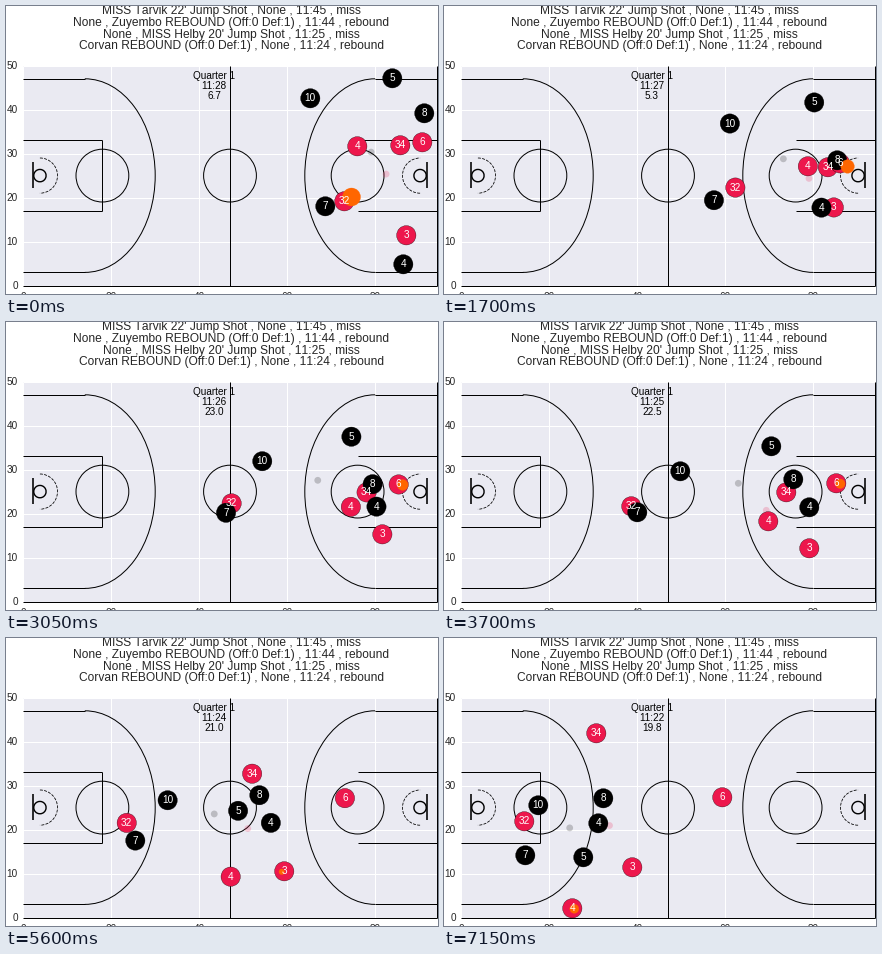
Write a matplotlib script that moves like this. It is 432 px wide and 288 px high and loops after 7.2 s.

```python
import numpy as np
import matplotlib.pyplot as plt
from matplotlib.animation import FuncAnimation
from matplotlib.patches import Arc, Circle, Rectangle

W, H, FRAMES = 432, 288, 144
X0, Y0, FT = 17.2, 279.6, 4.4  # court corner and pixels per foot
INK, RED, ORANGE = "#262626", "#ed174c", (1, 0.4, 0)

plt.rcParams["font.family"] = "Liberation Sans"
plt.rcParams["font.size"] = 10
plt.rcParams["text.kerning_factor"] = 6

# Each player: start, rebound, start of the fast break, end
KEYS = np.array([0, 48, 74, 143])
HOME = {
    "4": [(351, 140), (359, 171), (324, 199), (128, 270)],
    "34": [(394, 139), (374, 167), (342, 170), (152, 95)],
    "6": [(416, 136), (391, 162), (392, 161), (278, 159)],
    "32": [(338, 195), (263, 179), (187, 184), (80, 183)],
    "3": [(400, 229), (383, 200), (365, 226), (188, 229)],
}
AWAY = {
    "10": [(304, 92), (273, 128), (236, 149), (94, 167)],
    "5": [(386, 72), (359, 106), (327, 124), (139, 219)],
    "8": [(418, 107), (380, 164), (349, 157), (159, 160)],
    "7": [(319, 200), (246, 192), (193, 190), (81, 217)],
    "4": [(397, 258), (371, 187), (365, 185), (154, 185)],
}


def smooth_path(points):
    """Cubic Hermite curve through the key points, one row per frame."""
    p = np.array(points, float) + 0.3
    slope = np.gradient(p, KEYS, axis=0)
    t = np.arange(FRAMES)
    k = np.clip(np.searchsorted(KEYS, t, side="right") - 1, 0, len(KEYS) - 2)
    span = (KEYS[k + 1] - KEYS[k])[:, None]
    u = (t - KEYS[k])[:, None] / span
    return ((1 + 2 * u) * (1 - u) ** 2 * p[k]
            + u * (1 - u) ** 2 * span * slope[k]
            + u * u * (3 - 2 * u) * p[k + 1]
            + u * u * (u - 1) * span * slope[k + 1])


def court(x, y):
    return X0 + x * FT, Y0 - y * FT


fig = plt.figure(figsize=(W / 72, H / 72), dpi=72, facecolor="white")
ax = fig.add_axes([0, 0, 1, 1])
ax.set_xlim(0, W)
ax.set_ylim(H, 0)
ax.axis("off")


def line(x1, y1, x2, y2, color="black", lw=1):
    (a, b), (c, d) = court(x1, y1), court(x2, y2)
    ax.plot([a, c], [b, d], color=color, lw=lw, zorder=1,
            solid_capstyle="butt")


def arc(x, w, h, start=0, end=360, lw=1, **style):
    # Angles run clockwise because y points down
    ax.add_patch(Arc(court(x, 25), w * FT, h * FT, theta1=start, theta2=end,
                     color="black", lw=lw, zorder=1, **style))


def label(x, y, text, size=10, color=INK, ha="center", va="baseline", z=4):
    return ax.text(x, y, text, fontsize=size, color=color, ha=ha, va=va,
                   zorder=z)


def draw_court():
    ax.add_patch(Rectangle(court(0, 50), 94 * FT, 50 * FT, fc="#eaeaf2",
                           ec="none", zorder=0))
    for x in range(0, 100, 20):
        line(x, 0, x, 50, "white")
        label(court(x, 0)[0], 294, str(x))
    for y in range(0, 60, 10):
        line(0, y, 94, y, "white")
        label(12, court(0, y)[1] + 0.6, str(y), ha="right", va="center")

    line(0, 0, 94, 0)
    for x in (47, 94):
        line(x, 0, x, 50)
    for y in (3, 47):
        line(0, y, 14, y)
        line(80, y, 94, y)
    for y in (17, 33):
        line(0, y, 18, y)
        line(76, y, 94, y)
    line(18, 17, 18, 33)

    for x in (18, 47, 76):
        arc(x, 12, 12)
    arc(14, 32, 44, -90, 90)
    arc(80, 32, 44, 90, 270)
    for hoop, board, turn in ((3.8, 2.2, 0), (90.2, 91.8, 180)):
        arc(hoop, 2.8, 2.8, lw=1.4)
        arc(hoop, 8, 8, turn - 90, turn + 90, lw=0.8, linestyle="--")
        line(board, 22.2, board, 28, lw=1.6)


def draw_titles():
    rows = ("MISS Tarvik 22' Jump Shot , None , 11:45 , miss",
            "None , Zuyembo REBOUND (Off:0 Def:1) , 11:44 , rebound",
            "None , MISS Helby 20' Jump Shot , 11:25 , miss",
            "Corvan REBOUND (Off:0 Def:1) , None , 11:24 , rebound")
    for k, text in enumerate(rows):
        label(225.3, 8 + 11.8 * k, text, 12)


def disc(radius, **style):
    return ax.add_patch(Circle((0, 0), radius, **style))


class Team:
    def __init__(self, roster, color):
        self.paths = {n: smooth_path(p) for n, p in roster.items()}
        self.center = disc(3.4, fc=color, ec="none", alpha=0.2, zorder=2)
        self.players = [
            (path,
             disc(2.2 * FT, fc=color, ec="black", lw=0.3, zorder=3),
             label(0, 0, n, color="white", va="center", z=5))
            for n, path in self.paths.items()]

    def move(self, i):
        self.center.center = np.mean([p[i] for p in self.paths.values()],
                                     axis=0)
        for path, spot, number in self.players:
            spot.center = path[i]
            number.set_position(path[i])


def ball_at(i):
    """Position and radius: a missed shot, a rebound and two passes."""
    def hands(number, dx):
        return home.paths[number][i] + (dx, 0.5)

    shooter, rim = np.array([345.5, 191]), np.array(court(90.2, 25.3))
    six, three, four = hands("6", 4), hands("3", -2.5), hands("4", 2)
    stops = ((0, shooter, 9), (25, rim, 7.5), (37, six, 6.5), (79, six, 4.5),
             (90, three, 2.8), (124, three, 2.8), (137, four, 4.5),
             (FRAMES, four, 4.5))
    for (t0, a, r0), (t1, b, r1) in zip(stops, stops[1:]):
        if i < t1:
            u = (i - t0) / (t1 - t0)
            lift = 8 * u * (1 - u) if t0 == 0 else 0
            return a + (b - a) * u, r0 + (r1 - r0) * u + lift


draw_court()
draw_titles()
home, away = Team(HOME, RED), Team(AWAY, "black")
ball = disc(1, fc=ORANGE, ec=ORANGE, lw=0.3, zorder=4)
label(208, 73, "Quarter 1", color="black")
game_clock = label(208, 83, "", color="black")
shot_clock = label(208, 93, "", color="black")


def update(i):
    home.move(i)
    away.move(i)
    ball.center, ball.radius = ball_at(i)
    game_clock.set_text(f"11:{int(28.7 - 0.04 * i):02d}")
    # The shot clock restarts at the rebound
    left = 6.7 - 0.04 * i if i < 37 else 23.549 - 0.0399 * (i - 48)
    shot_clock.set_text(f"{left:.1f}")
    return []


anim = FuncAnimation(fig, update, frames=FRAMES, interval=50, repeat=True,
                     repeat_delay=0)
plt.show()
```
